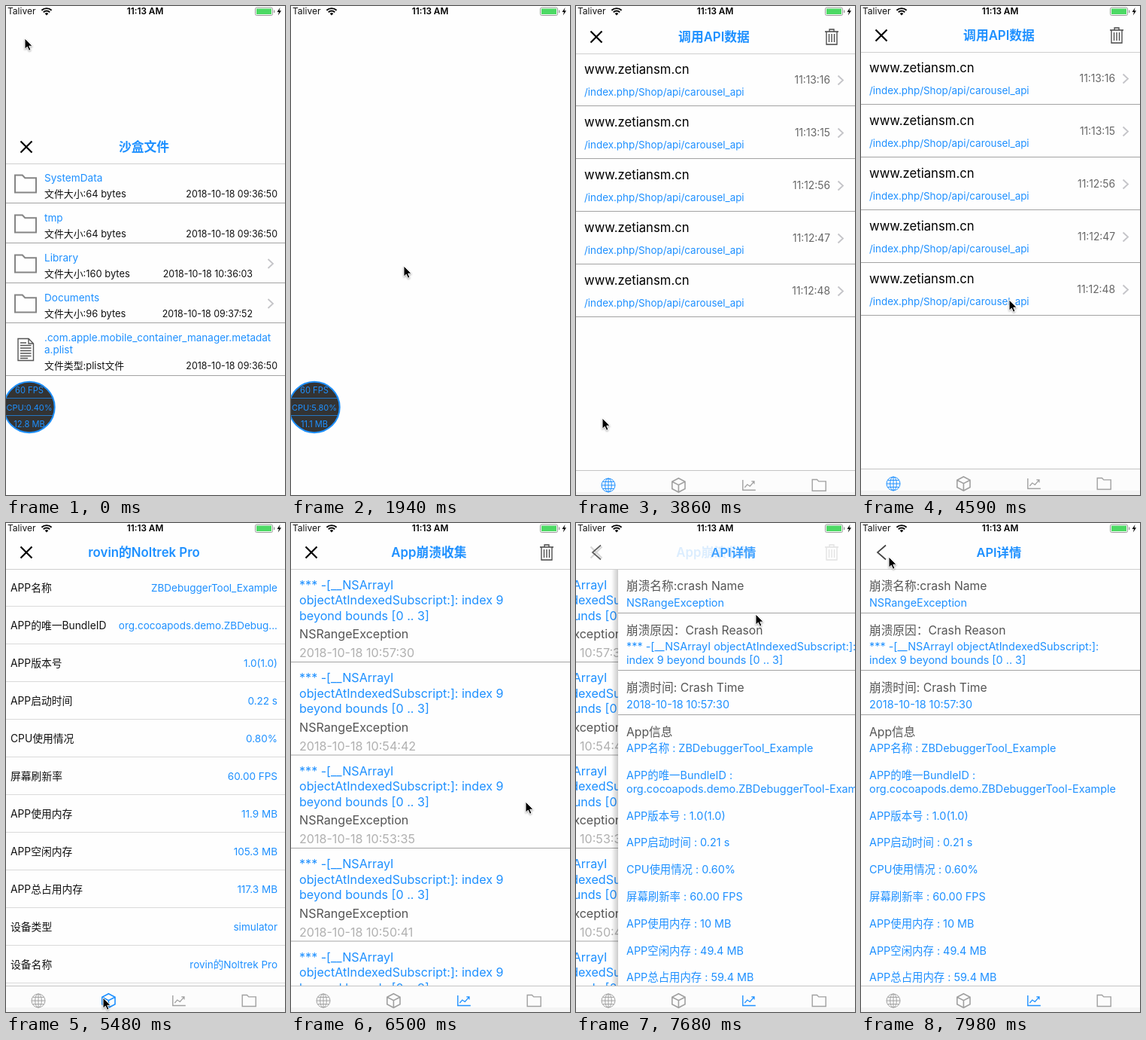
Animation of 371x649 px, one loop 8000 ms. Source, as an HTML page:

```html
<!DOCTYPE html>
<html lang="zh">
<head>
<meta charset="utf-8">
<title>Debug panel</title>
<style>
html, body { margin: 0; width: 100%; height: 100%; overflow: hidden; background: #fefefe; }
svg { display: block; font-family: Inter, "Noto Sans CJK SC", "Noto Sans CJK", sans-serif; }
.move { animation: 8s step-end infinite; }

/* 1% = 80 ms */
#sheet { animation-name: sheet; }
@keyframes sheet {
  0% { transform: translateY(148px); }
  1.875% { transform: translateY(570px); }
  3.75% { transform: translateY(641px); }
  5.625% { transform: translateY(670px); }
  44.5% { transform: translateY(184px); }
  46.375% { transform: translateY(21px); }
  48.25% { transform: translateY(2px); }
  50.125%, 100% { transform: none; }
}

#files { animation-name: files; }
#api { animation-name: api; }
#info { animation-name: info; }
#crash { animation-name: crash; }
@keyframes files { 0% { opacity: 1; } 42.625%, 100% { opacity: 0; } }
@keyframes api { 0% { opacity: 0; } 42.625% { opacity: 1; } 68.5%, 100% { opacity: 0; } }
@keyframes info { 0% { opacity: 0; } 68.5% { opacity: 1; } 75.75%, 100% { opacity: 0; } }
@keyframes crash { 0% { opacity: 0; } 75.75%, 100% { opacity: 1; } }

#list { animation-name: list; }
@keyframes list {
  0% { transform: none; }
  92.375% { transform: translateX(-14px); }
  94.25% { transform: translateX(-95px); }
  96.125% { transform: translateX(-110px); }
  97.875%, 100% { transform: translateX(-111px); }
}
#detail { animation-name: detail; }
@keyframes detail {
  0% { transform: translateX(400px); }
  92.375% { transform: translateX(323px); }
  94.25% { transform: translateX(56px); }
  96.125% { transform: translateX(6px); }
  97.875%, 100% { transform: none; }
}
#detailText { animation-name: inset; }
@keyframes inset { 0% { transform: translateX(4px); } 94.25%, 100% { transform: none; } }
#listNav { animation-name: listNav; }
@keyframes listNav { 0% { opacity: 1; } 94.25% { opacity: .15; } 96.125%, 100% { opacity: 0; } }
#detailNav { animation-name: detailNav; }
@keyframes detailNav {
  0% { opacity: 0; }
  92.375% { opacity: .06; }
  94.25% { opacity: .85; }
  96.125%, 100% { opacity: 1; }
}
#detailTitle { animation-name: detailTitle; }
@keyframes detailTitle {
  0% { transform: translateX(152px); }
  94.25% { transform: translateX(26px); }
  96.125% { transform: translateX(2px); }
  97.875%, 100% { transform: none; }
}

#ball { animation-name: files; }
#stat0 { animation-name: stat0; }
#stat1 { animation-name: stat1; }
#stat2 { animation-name: stat2; }
@keyframes stat0 { 0% { opacity: 1; } 13%, 100% { opacity: 0; } }
@keyframes stat1 { 0% { opacity: 0; } 13% { opacity: 1; } 39%, 100% { opacity: 0; } }
@keyframes stat2 { 0% { opacity: 0; } 39%, 100% { opacity: 1; } }

#cursor { animation-name: cursor; filter: drop-shadow(0 1px 1px rgba(0, 0, 0, .35)); }
@keyframes cursor {
  0% { transform: translate(25px, 43px); }
  3.75% { transform: translate(55px, 110px); }
  5.625% { transform: translate(120px, 250px); }
  7.5% { transform: translate(157px, 336px); }
  24.25% { transform: translate(150px, 345px); }
  26.125% { transform: translate(145px, 420px); }
  27.875% { transform: translate(132px, 540px); }
  29.75% { transform: translate(113px, 621px); }
  31.625% { transform: translate(95px, 614px); }
  35.25% { transform: translate(68px, 588px); }
  37.125% { transform: translate(44px, 558px); }
  39% { transform: translate(35px, 547px); }
  51.875% { transform: translate(62px, 510px); }
  53.75% { transform: translate(135px, 410px); }
  55.5% { transform: translate(199px, 337px); }
  57.375% { transform: translate(197px, 390px); }
  59.25% { transform: translate(182px, 500px); }
  61% { transform: translate(148px, 600px); }
  62.875% { transform: translate(129px, 630px); }
  70.375% { transform: translate(175px, 631px); }
  72.125% { transform: translate(230px, 632px); }
  79.5% { transform: translate(262px, 550px); }
  81.25% { transform: translate(312px, 370px); }
  83.125% { transform: translate(320px, 190px); }
  84.875% { transform: translate(284px, 98px); }
  86.75% { transform: translate(239px, 121px); }
  96.125% { transform: translate(180px, 96px); }
  97.875% { transform: translate(85px, 60px); }
  99.75%, 100% { transform: translate(37px, 45px); }
}
</style>
</head>
<body>
<svg id="stage" width="371" height="649" viewBox="0 0 371 649"></svg>
<script>
const BLUE = '#1e90ff', INK = '#111', GREY = '#555', LINE = '#a3a3a3', PALE = '#dadada', PAPER = '#fefefe';

const text = (x, y, str, size, fill = INK, extra = '') =>
  `<text x="${x}" y="${y}" font-size="${size}" fill="${fill}" ${extra}>${str}</text>`;
const right = (x, y, str, size, fill) => text(x, y, str, size, fill, 'text-anchor="end"');
const mid = (x, y, str, size, fill, weight = 400) =>
  text(x, y, str, size, fill, `text-anchor="middle" font-weight="${weight}"`);
const rect = (x, y, w, h, fill) => `<rect x="${x}" y="${y}" width="${w}" height="${h}" fill="${fill}"/>`;
const rule = (y, color = LINE) => rect(0, y, 371, 1, color);
const stroke = (d, color, width = 1) => `<path d="${d}" fill="none" stroke="${color}" stroke-width="${width}"/>`;
const at = (x, y, body) => `<g transform="translate(${x} ${y})">${body}</g>`;
const layer = (id, body) => `<g id="${id}" class="move">${body}</g>`;

// Icons, drawn around their centres
const chevron = y => at(352, y, stroke('M-3.5-6L3 0L-3.5 6', '#c4c4c8', 1.8));
const folder = (w, h, color, width) => stroke(
  `M${-w} ${-h}H${-w * .3}L${-w * .05} ${-h * .68}H${w}V${h}H${-w}Z`, color, width);
const close = at(27, 39, stroke('M-7.5-7.5L7.5 7.5M7.5-7.5L-7.5 7.5', '#000', 2.2));
const trash = at(340, 39, stroke(
  'M-9-7H9M-3-7.5V-10H3V-7.5M-7-7V10H7V-7M-3.5-4V7M0-4V7M3.5-4V7', '#444', 1.3));
const page = stroke('M-10-14.5H4L10.5-8V14.5H-10ZM4-14.5V-8H10.5', '#555', 1.4) +
  stroke('M-7-9H1M-7-5.5H7.5M-7-2H7.5M-7 1.5H7.5M-7 5H7.5M-7 8.5H7.5M-7 11.5H3', '#555', 1.4);

const tabIcons = [
  c => `<g fill="none" stroke="${c}"><circle r="9"/><ellipse rx="4.3" ry="9"/>` +
    '<path d="M0-9V9M-9 0H9M-7.6-4.6H7.6M-7.6 4.6H7.6"/></g>',
  c => stroke('M0-9.3L8.6-4.8V4.8L0 9.3L-8.6 4.8V-4.8ZM-8.6-4.8L0-.3L8.6-4.8M0-.3V9.3', c, 1.6),
  c => stroke('M-8-7V6.5H9', c, 1.4) + stroke('M-5.5 3L-2-1L1.5 1.5L7-5M3.5-5.2H7.2V-1.5', c, 1.2),
  c => folder(9, 7.5, c, 1.4)
];
const tabBar = active => rect(0, 614, 371, 60, '#fcfcfc') + rule(614, '#c4c4c4') + rect(0, 643, 371, 40, '#f4f4f4') +
  tabIcons.map((icon, i) => at(43 + i * 93.4, 634, icon(i === active ? BLUE : '#a0a0a0'))).join('');

const title = (str, size = 16.8) => mid(183.5, 45, str, size, BLUE, 600);
const navBack = rect(0, 0, 371, 61, PAPER) + rule(61, '#cfcfcf');
const screen = (id, name, body, tab, tools = '') =>
  layer(id, rect(0, 0, 371, 649, PAPER) + body + navBack + close + title(name) + tools + tabBar(tab));

const fileRows = [
  ['SystemData', 64, '09:36:50'], ['tmp', 64, '09:36:50'],
  ['Library', 160, '10:36:03', true], ['Documents', 96, '09:37:52', true]
].map(([name, size, time, open], i) => at(0, i * 53,
  at(26, 88, folder(14, 11.5, '#858585', 2)) + text(51, 85, name, 13.6, BLUE) +
  text(51, 106, `文件大小:${size} bytes`, 12.9) +
  right(open ? 328 : 361, 106, `2018-10-18 ${time}`, 12.4) +
  (open ? chevron(79 + 115 - 106) : '') + rule(113))).join('');
const plistRow = at(26, 308, page) +
  text(51, 296.5, '.com.apple.mobile_container_manager.metadat', 13.5, BLUE) +
  text(51, 313, 'a.plist', 13.5, BLUE) + text(51, 334, '文件类型:plist文件', 12.9) +
  right(361, 334, '2018-10-18 09:36:50', 12.4) + rule(342);

const apiRows = ['13:16', '13:15', '12:56', '12:47', '12:48'].map((time, i) => at(0, i * 70,
  text(11, 88, 'www.zetiansm.cn', 16.7, '#000') +
  text(11, 117, '/index.php/Shop/api/carousel_api', 13.4, BLUE) +
  right(338, 101, '11:' + time, 13.8, '#666') + chevron(96.5) + rule(130))).join('');

const device = 'rovin的Noltrek Pro';
const infoRows = [
  ['APP名称', 'ZBDebuggerTool_Example'], ['APP的唯一BundleID', 'org.cocoapods.demo.ZBDebug...'],
  ['APP版本号', '1.0(1.0)'], ['APP启动时间', '0.22 s'], ['CPU使用情况', '0.80%'],
  ['屏幕刷新率', '60.00 FPS'], ['APP使用内存', '11.9 MB'], ['APP空闲内存', '105.3 MB'],
  ['APP总占用内存', '117.3 MB'], ['设备类型', 'simulator'], ['设备名称', device]
].map(([label, value], i) => at(0, i * 50,
  text(6, 91, label, 13.8) + right(361, 91, value, 13.5, BLUE) + rule(110, PALE))).join('');

const crashRows = ['57:30', '54:42', '53:35', '50:41', '48:12'].map((time, i) => at(0, i * 123.5,
  text(11, 87.5, '*** -[__NSArrayI', 16.1, BLUE) +
  text(11, 108, 'objectAtIndexedSubscript:]: index 9', 16.1, BLUE) +
  text(11, 128.5, 'beyond bounds [0 .. 3]', 16.1, BLUE) +
  text(11, 153, 'NSRangeException', 16.1, GREY) +
  text(11, 178, '2018-10-18 10:' + time, 16.1, '#b0b0b0') + rule(184))).join('');

const head = (y, str) => text(11, y, str, 15.7, GREY);
const line = (y, str) => text(11, y, str, 14.4, BLUE);
const appLines = [
  'APP版本号 : 1.0(1.0)', 'APP启动时间 : 0.21 s', 'CPU使用情况 : 0.60%', '屏幕刷新率 : 60.00 FPS',
  'APP使用内存 : 10 MB', 'APP空闲内存 : 49.4 MB', 'APP总占用内存 : 59.4 MB'
].map((str, i) => line(393.5 + i * 35.8, str)).join('');
const detailText =
  head(89, '崩溃名称:crash Name') + line(110.5, 'NSRangeException') +
  head(147.5, '崩溃原因：Crash Reason') + line(168.5, '*** -[__NSArrayI objectAtIndexedSubscript:]:') +
  line(186.5, 'index 9 beyond bounds [0 .. 3]') +
  head(224, '崩溃时间: Crash Time') + line(245.5, '2018-10-18 10:57:30') +
  head(282.5, 'App信息') + line(304, 'APP名称 : ZBDebuggerTool_Example') +
  line(339.5, 'APP的唯一BundleID :') + line(357.5, 'org.cocoapods.demo.ZBDebuggerTool-Example') + appLines;
const detail = rect(-9, 0, 9, 649, 'url(#shade)') + rect(0, 0, 371, 649, PAPER) +
  [119, 195, 254].map(y => rule(y)).join('') + layer('detailText', detailText);
const crashScreen = layer('crash', rect(0, 0, 371, 649, PAPER) +
  layer('list', crashRows) + layer('detail', detail) + navBack +
  layer('listNav', close + title('App崩溃收集') + trash) +
  layer('detailNav', stroke('M33 29.5L22 39L33 48.5', '#444', 1.7) + layer('detailTitle', title('API详情', 16.4))) +
  tabBar(2));

const stats = [['0.40', '12.8'], ['5.80', '11.1'], ['0.80', '11.1']].map(([cpu, mem], i) => layer('stat' + i,
  mid(31, 536.5, `CPU:${cpu}%`, 11, BLUE) + mid(31, 559, mem + ' MB', 11.1, BLUE))).join('');
const ball = layer('ball', `<circle cx="31" cy="532.5" r="33.7" fill="#333" stroke="${BLUE}" stroke-width="2"/>` +
  stroke('M0 520.5H62M0 543.5H62', '#2576c4') + mid(31, 513.5, '60 FPS', 11.1, BLUE) + stats);

const status = text(2, 11.3, 'Taliver', 12, '#111') + mid(185, 11.3, '11:13 AM', 11.8, '#000', 600) +
  at(54, 12, stroke('M-6.6-6.2A9.4 9.4 0 0 1 6.6-6.2M-4.2-3.8A6 6 0 0 1 4.2-3.8', '#000', 1.9) +
    '<path d="M0 .5L-2.3-2A3.3 3.3 0 0 1 2.3-2Z"/>') +
  '<rect x="331.5" y="2" width="23" height="10.5" rx="2" fill="none" stroke="#999"/>' +
  rect(333, 3.5, 20, 7.5, '#4cd964') + rect(356, 5.5, 1.3, 3.5, '#999') +
  '<path d="M364.5 2L360.5 8H363L361.8 12.5L366 6.3H363.4Z"/>';

document.getElementById('stage').innerHTML =
  '<defs><linearGradient id="shade"><stop stop-opacity="0"/><stop offset="1" stop-opacity=".2"/></linearGradient></defs>' +
  layer('sheet', screen('files', '沙盒文件', fileRows + plistRow, 3) +
    screen('api', '调用API数据', apiRows, 0, trash) +
    screen('info', device, infoRows, 1) + crashScreen) +
  status + ball +
  layer('cursor', '<path d="M0 0V14.2L3.3 11.2L5.6 16.3L8 15.2L5.8 10.2H10.2Z" stroke="#fff" stroke-width="1"/>');
</script>
</body>
</html>
```
